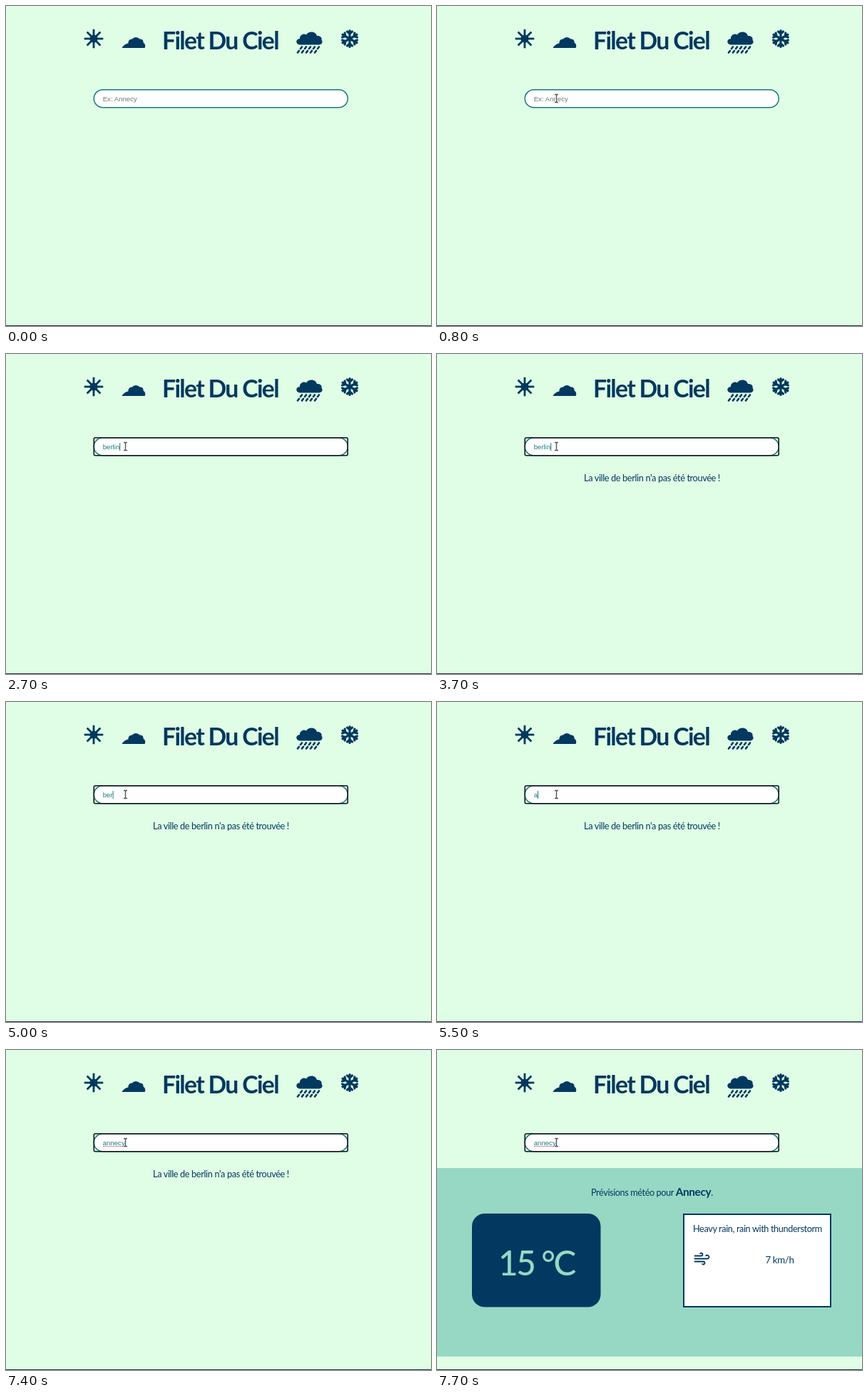
These frames come from a looping animation (596x450 px, 8000 ms). An HTML page:

```html
<!DOCTYPE html>
<html lang="fr">
<head>
<meta charset="utf-8">
<style>
  html, body { margin: 0; width: 100%; height: 100%; overflow: hidden; background: #dffee5; }
  svg { display: block; }
  text { white-space: pre; fill: #033860; font-family: Lato, sans-serif; letter-spacing: -.03em; }
  .large { letter-spacing: -.05em; }
  .field { font: 9.65px "Liberation Sans", Arial, sans-serif; letter-spacing: 0; }
  .line { fill: none; stroke: #033860; stroke-linecap: round; stroke-linejoin: round; }
</style>
</head>
<body>
<svg width="596" height="450" viewBox="0 0 596 450">
  <rect width="596" height="450" fill="#dffee5"/>
  <rect y="449" width="596" height="1" fill="#26333a"/>

  <g fill="#033860">
    <circle cx="123" cy="46" r="5.6"/>
    <g id="rays" stroke="#033860" stroke-width="2.8" transform="translate(123 46)"></g>
    <path d="M162.500 59C164 56 168 53 171.500 52.500C171 49 174 46 177 46.500C179 43 185 43 187.500 46.500C191 46 193 48.500 192.500 51.500C195.500 53 196 57 194.500 59Z"/>
    <path d="M412 54.500C406 54 405.500 46.500 412 46C411.500 40.500 418 38 421 40.500C424 35 434 35 436 42C440 41.500 443.500 44 442.500 47.500C445 50.500 443 54.500 439 54.500Z"/>
    <path class="line" stroke-width="2.7" d="M415 57.500l-2 2.500M421 57.500l-2 2.500M427 57.500l-2 2.500M433 57.500l-2 2.500M439 57.500l-2 2.500M411 63l-2 2.500M417 63l-2 2.500M423 63l-2 2.500M429 63l-2 2.500M435 63l-2 2.500"/>
    <g id="flake" class="line" stroke-width="3.2" transform="translate(482 46)"></g>
  </g>
  <text class="large" x="219" y="61" font-weight="700" data-width="163" data-max="37">Filet Du Ciel</text>

  <rect x="123.250" y="117.700" width="356" height="25" rx="12.500" fill="#fff" stroke="#15797b" stroke-width="1.500"/>
  <rect id="focus" x="123.250" y="117.700" width="356" height="25" rx="2" fill="none" stroke="#101014" stroke-width="1.500"/>
  <text id="hint" class="field" x="135.700" y="134" style="fill:#757575">Ex: Annecy</text>
  <text id="typed" class="field" x="135.700" y="134" style="fill:#187c80"></text>
  <path id="spelling" d="M136 135.500H168" stroke="#e2504e" stroke-width="1.2" stroke-dasharray="1.6 .8"/>
  <rect id="caret" y="125" width="1" height="11" fill="#187c80"/>

  <text id="missing" x="206" y="179" data-width="191" data-max="16">La ville de berlin n'a pas été trouvée !</text>

  <g id="forecast">
    <rect y="166" width="596" height="265" fill="#97d8c4"/>
    <text x="216" y="205" data-width="171" data-max="15.500">Prévisions météo pour <tspan font-size="1.22em" font-weight="700">Annecy</tspan>.</text>
    <rect x="49" y="230" width="180.500" height="131.500" rx="18" fill="#033860"/>
    <text class="large" x="86" y="317" font-weight="500" data-width="107" data-max="59" style="fill:#97d8c4">15 °C</text>
    <rect x="346" y="231" width="206" height="130" fill="#fff" stroke="#033860" stroke-width="2"/>
    <text x="359" y="256" data-width="181" data-max="16">Heavy rain, rain with thunderstorm</text>
    <path class="line" stroke-width="1.8" transform="translate(359.500 281.500)"
      d="M9.600 4.600A2 2 0 1 1 11 8H2M12.600 19.400A2 2 0 1 0 14 16H2M17.700 7.700A2.500 2.500 0 1 1 19.500 12H2"/>
    <text x="460.500" y="300" data-width="40" data-max="16">7 km/h</text>
  </g>

  <path id="arrow" d="M0 0V14L3.300 11L5.600 16L8 15L5.800 10H10Z" fill="#111" stroke="#fff"/>
  <g id="beam" fill="none">
    <path d="M-2.500-5.500h5M0-5.500v11M-2.500 5.500h5" stroke="#fff" stroke-width="3"/>
    <path d="M-2.500-5.500h5M0-5.500v11M-2.500 5.500h5" stroke="#555" stroke-width="1.4"/>
  </g>
</svg>
<script>
const LOOP = 8000, STEP = 100;
const $ = id => document.getElementById(id);
const show = (id, on) => $(id).style.visibility = on ? 'visible' : 'hidden';
const within = (t, from, to) => t >= from && t < to;

const spokes = (count, path) => Array.from({ length: count }, (_, i) =>
  `<path d="${path}" transform="rotate(${i * 360 / count})"/>`).join('');
$('rays').innerHTML = spokes(8, 'M0 0V-13.3');
$('flake').innerHTML = spokes(6, 'M0 0V-11.5M-3.500-10L0-7L3.500-10');

// Pick the font size at which each line has its natural place in the layout.
for (const el of document.querySelectorAll('[data-width]')) {
  el.style.fontSize = '20px';
  const size = 20 * el.dataset.width / el.getComputedTextLength();
  el.style.fontSize = Math.min(size, el.dataset.max) + 'px';
}

const edits = [[0, ''], [4500, 'berli'], [5000, 'ber'], [5100, ''], [5500, 'a']];
[...'berlin'].forEach((_, i) => edits.push([1900 + i * STEP, 'berlin'.slice(0, i + 1)]));
[...'nnecy'].forEach((_, i) => edits.push([5900 + i * STEP, 'annecy'.slice(0, i + 2)]));
edits.sort((a, b) => a[0] - b[0]);

function draw(t) {
  const text = edits.findLast(([at]) => at <= t)[1];
  const typed = $('typed');
  typed.textContent = text;
  show('hint', !text);
  show('focus', t >= 1000);
  show('spelling', t >= 7400);
  show('missing', within(t, 3100, 7700));
  show('forecast', t >= 7700);

  $('caret').setAttribute('x', 135.7 + (text ? typed.getComputedTextLength() : 0));
  show('caret', t >= 1000 && !within(t, 1600, 1900) && !within(t, 3100, 3600));

  const left = (1 - Math.min(t / 800, 1)) ** 2;
  const x = 167.5 + 290 * left, y = 130 + 390 * left;
  const overField = y < 143;
  for (const id of ['arrow', 'beam']) $(id).setAttribute('transform', `translate(${x} ${y})`);
  show('arrow', t >= STEP && !overField);
  show('beam', t >= STEP && overField);
}

function tick() {
  draw(Math.floor(performance.now() % LOOP / STEP) * STEP);
  requestAnimationFrame(tick);
}
tick();
</script>
</body>
</html>
```
